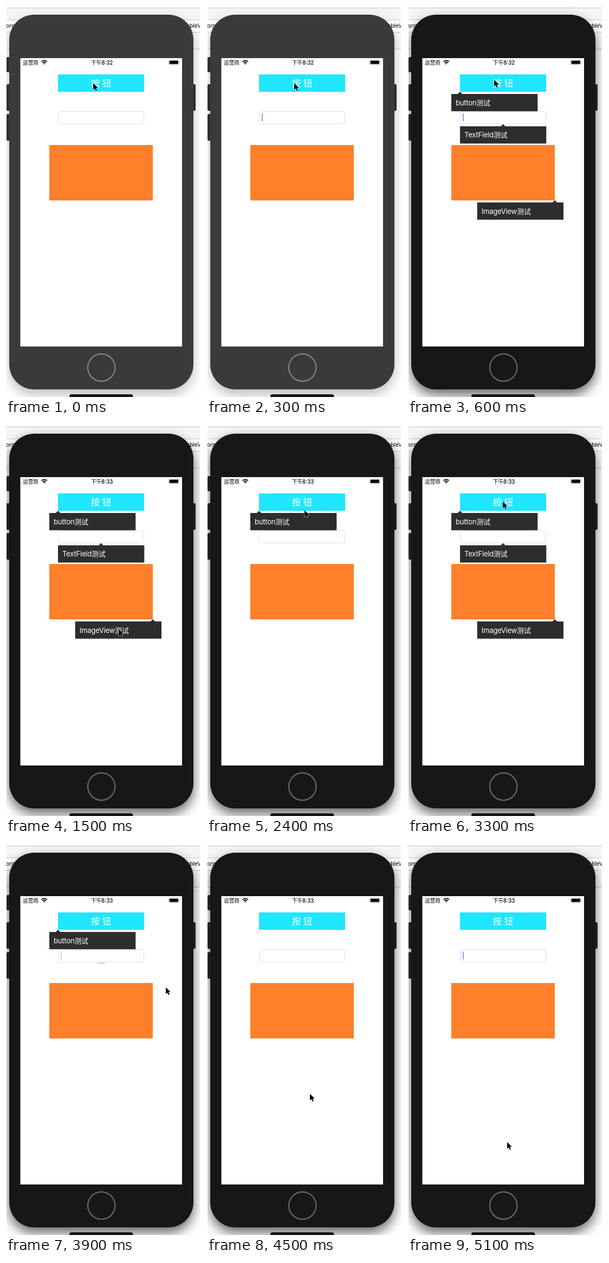
Recreate the animation shown at these times as an HTML page. Size 360 by 720 pixels, loop 5.4 s.

```html
<!DOCTYPE html>
<html lang="zh">
<head>
<meta charset="utf-8">
<title>Tooltip demo</title>
<style>
  html, body { margin: 0; width: 100%; height: 100%; overflow: hidden; background: #fff; }
  svg { display: block; width: 360px; height: 720px; }
  text { font-family: Inter, "Noto Sans CJK SC", "Noto Sans CJK", sans-serif; }
  .tip text { font-size: 13px; letter-spacing: -.2px; fill: #fff; }
  .tip rect, .tip path { fill: #2d2d2d; }
</style>
</head>
<body>
<svg viewBox="0 0 360 720">
  <defs>
    <clipPath id="stage"><rect x="1" y="2" width="357" height="718"/></clipPath>
    <filter id="blur" x="-20%" y="-20%" width="140%" height="140%">
      <feGaussianBlur stdDeviation="11"/>
    </filter>
  </defs>
  <rect width="360" height="720" fill="#fff"/>

  <g clip-path="url(#stage)">
    <rect y="3" width="360" height="22" fill="#f5f5f5"/>
    <rect y="48" width="360" height="31" fill="#fafafa"/>
    <path d="M0 3.5H360M0 25.5H360M0 48.5H360M0 79.5H360" stroke="#c4c4c4"/>
    <text x="0" y="40" font-size="10">orm</text>
    <text x="360" y="40" font-size="10" text-anchor="end">ableV</text>
    <rect id="shadow" x="6" y="26" width="340" height="690" rx="46" filter="url(#blur)"/>
    <g id="keys">
      <rect x="1" y="94" width="9" height="28" rx="2"/>
      <rect x="1" y="144" width="9" height="49" rx="2"/>
      <rect x="1" y="199" width="9" height="49" rx="2"/>
      <rect x="342" y="144" width="8" height="49" rx="2"/>
    </g>
    <rect id="body" x="6" y="16" width="340" height="690" rx="46"/>
    <circle id="home" cx="176.2" cy="665.8" r="25.2" fill="none" stroke-width="2.2"/>
    <rect x="117" y="715" width="117.5" height="12" rx="4" fill="#151515"/>
  </g>

  <rect x="26.5" y="96" width="298.5" height="531" fill="#fff"/>
  <text x="31" y="107.5" font-size="9.7">运营商</text>
  <g fill="none" stroke="#000" stroke-width="1.7">
    <path d="M65.5 102.4Q70.7 97.7 75.9 102.4M67.5 104.7Q70.7 101.8 73.9 104.7"/>
    <path d="M70.7 107.8L69 106Q70.7 104.6 72.4 106Z" fill="#000" stroke="none"/>
  </g>
  <text id="clock" x="177" y="107.5" font-size="9.7" font-weight="500" text-anchor="middle"></text>
  <rect x="300.5" y="99.5" width="18.5" height="8.5" rx="2" fill="#fff" stroke="#999" stroke-width=".8"/>
  <rect x="301.7" y="100.7" width="16.1" height="6.1" rx="1"/>
  <path d="M320.2 102.3Q321.6 103.8 320.2 105.3Z" fill="#888"/>

  <rect x="96" y="126" width="159" height="32" fill="#20e6ff"/>
  <text x="175.5" y="148" font-size="16.4" fill="#fff" text-anchor="middle">按 钮</text>
  <rect x="96.5" y="194.3" width="158" height="22.7" rx="3" fill="#fff" stroke="#dedede"/>
  <rect id="caret" x="101.2" y="198" width="1.4" height="14.5"/>
  <rect x="80" y="256" width="191" height="102" fill="#ff7f2a"/>
  <rect id="remnant" x="168" y="218" width="15" height="3" fill="#dcdcdc"/>
  <g id="tips"></g>
  <path id="cursor" d="M0 0V12.2L2.8 9.6L4.8 14L6.9 13L4.9 8.8H8.8Z"
        fill="#000" stroke="#fff" stroke-width="1" stroke-linejoin="round" paint-order="stroke"/>
</svg>
<script>
  const STEP = 300, STEPS = 18;
  const get = id => document.getElementById(id);
  const set = (id, attrs) => {
    for (const key in attrs) get(id).setAttribute(key, attrs[key]);
  };
  const show = (node, on) => node.setAttribute("visibility", on ? "visible" : "hidden");

  // Pointer position for each step of the loop
  const pointer = [
    [161, 142], [161, 142], [159, 136], [199, 150], [203, 345], [208, 376],
    [190, 232], [184, 236], [180, 157], [178, 146], [175, 141], [175, 141],
    [178, 218], [295, 264], [200, 448], [190, 460], [188, 460], [183, 549]
  ];
  const caretSteps = [1, 2, 4, 6, 10, 12, 13, 14, 16, 17];

  // Visible intervals are [first step, step after last]
  const tips = [
    { x: 80, y: 162, arrow: 96, label: "button测试", spans: [[2, 9], [11, 14]] },
    { x: 96, y: 221.5, arrow: 175.5, label: "TextField测试", spans: [[2, 8], [11, 13]] },
    { x: 127.7, y: 361.7, arrow: 271, label: "ImageView测试", spans: [[2, 6], [11, 13]] }
  ];
  get("tips").innerHTML = tips.map(({ x, y, arrow, label }) => `
    <g class="tip">
      <path d="M${arrow - 4.5} ${y + .3}L${arrow} ${y - 4}L${arrow + 4.5} ${y + .3}Z"/>
      <rect x="${x}" y="${y}" width="159.3" height="31.8"/>
      <text x="${x + 8}" y="${y + 20.8}">${label}</text>
    </g>`).join("");
  const tipNodes = [...get("tips").children];

  function draw(ms) {
    const step = Math.floor(ms / STEP) % STEPS;
    const active = step >= 2;
    set("body", { fill: active ? "#171717" : "#3a3a3a" });
    set("keys", { fill: active ? "#202020" : "#2d2d2d" });
    set("home", { stroke: active ? "#686868" : "#858585" });
    set("shadow", { opacity: active ? .6 : .25 });
    get("clock").textContent = step < 5 ? "下午8:32" : "下午8:33";

    tips.forEach((tip, i) =>
      show(tipNodes[i], tip.spans.some(([from, to]) => step >= from && step < to)));
    const fading = step === 13;
    show(get("remnant"), fading);
    show(get("caret"), caretSteps.includes(step));
    set("caret", { fill: fading ? "#b4cbc8" : "#5b7fe8" });
    set("cursor", { transform: `translate(${pointer[step]})` });
  }

  const start = performance.now();
  function tick() {
    draw(performance.now() - start);
    requestAnimationFrame(tick);
  }
  tick();
</script>
</body>
</html>
```
